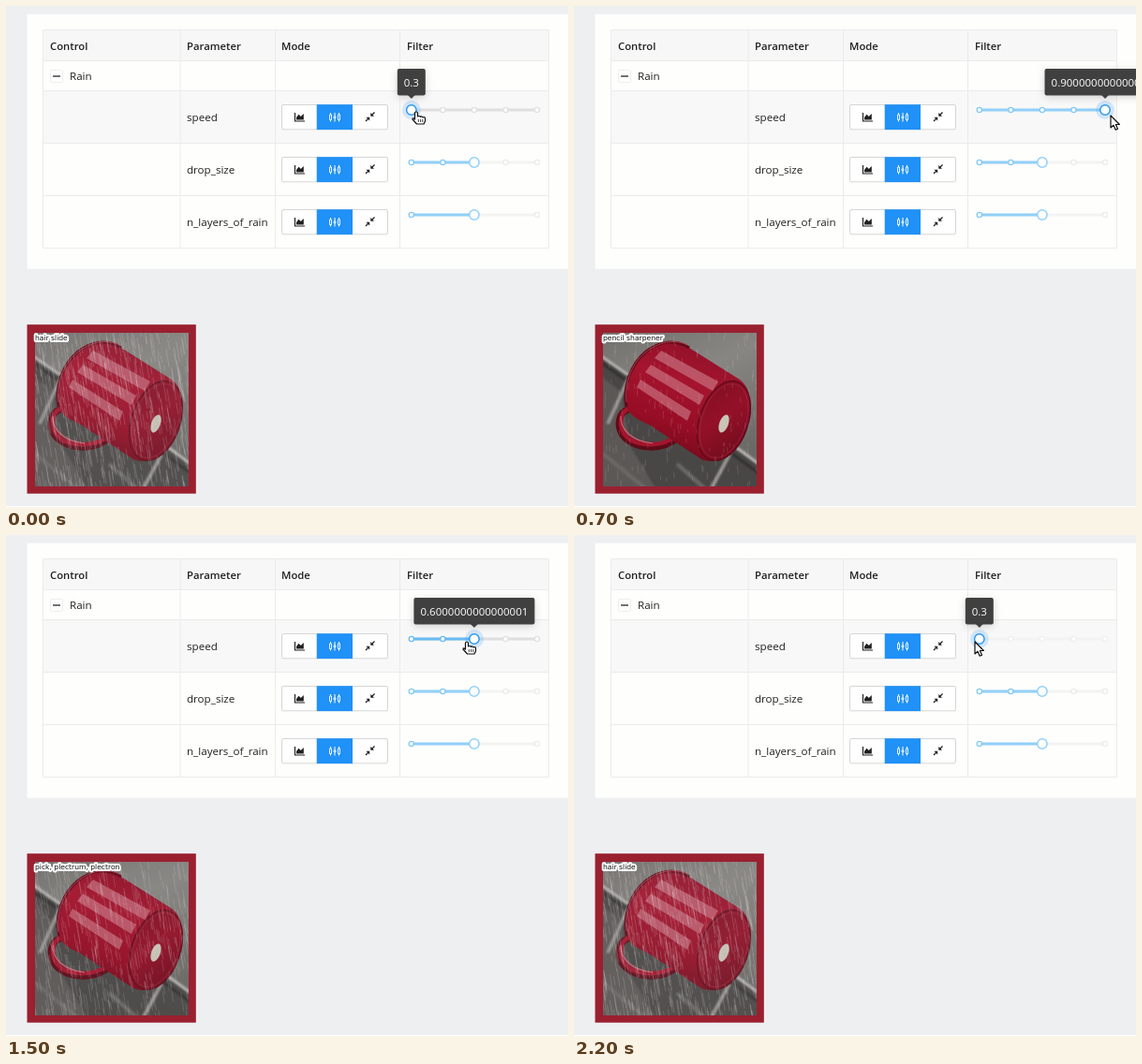
Animation of 600x535 px, one loop 2.3 s. Source, as an HTML page:

```html
<!DOCTYPE html>
<html lang="en">
<head>
<meta charset="utf-8">
<title>Rain controls</title>
<style>
  html, body { margin: 0; width: 100%; height: 100%; overflow: hidden; background: #eeeff1; }
  svg { display: block; width: 600px; height: 535px; font: 11.6px "Open Sans", "Noto Sans", sans-serif; }
  .head { font-weight: 600; font-size: 11.3px; }
  .label { font: 7.6px "DejaVu Sans", sans-serif; paint-order: stroke; stroke: #fff; stroke-width: 4px; stroke-linejoin: round; }
</style>
</head>
<body>
<svg viewBox="0 0 600 535" fill="#202020">
  <defs>
    <filter id="shadow" x="-30%" y="-60%" width="160%" height="240%">
      <feDropShadow dx="0" dy="2" stdDeviation="4" flood-opacity=".16"/>
    </filter>
    <filter id="soft"><feGaussianBlur stdDeviation=".8"/></filter>
    <linearGradient id="wall" x2=".5" y2="1">
      <stop stop-color="#73716e"/><stop offset=".45" stop-color="#888682"/><stop offset="1" stop-color="#6b6966"/>
    </linearGradient>
    <linearGradient id="enamel" x1=".65" y1="0" x2=".3" y2="1">
      <stop stop-color="#8e1128"/><stop offset=".35" stop-color="#a5142e"/>
      <stop offset=".7" stop-color="#960d25"/><stop offset="1" stop-color="#6c0a1a"/>
    </linearGradient>
    <linearGradient id="base" x2=".8" y2="1">
      <stop stop-color="#800e22"/><stop offset=".5" stop-color="#941128"/><stop offset="1" stop-color="#700b1d"/>
    </linearGradient>
    <clipPath id="photo"><rect x="31" y="349" width="164" height="164"/></clipPath>
  </defs>

  <rect width="600" height="535" fill="#eeeff1"/>
  <rect y="534" width="600" height="1" fill="#fff"/>
  <rect x="22.7" y="8.7" width="578" height="272" fill="#fefefd"/>
  <rect x="40" y="26" width="540" height="32" fill="#f8f7f7"/>
  <rect x="40" y="91" width="540" height="56" fill="#f8f8f8"/>
  <path d="M39.5 25.5H579.5V258.5H39.5ZM39.5 58.5H579.5M39.5 90.5H579.5M39.5 146.5H579.5M39.5 202.5H579.5M186 25.5V258.5M287.5 25.5V258.5M420.5 25.5V258.5" fill="none" stroke="#ebebeb"/>
  <g class="head">
    <text x="47" y="46.5">Control</text><text x="193" y="46.5">Parameter</text>
    <text x="294" y="46.5">Mode</text><text x="428" y="46.5">Filter</text>
  </g>
  <rect x="47.5" y="68.5" width="13" height="13" rx="1.5" fill="#fff" stroke="#eee"/>
  <path d="M50 75H58" stroke="#262626" stroke-width="1.3"/>
  <text x="68" y="79.3">Rain</text>
  <g id="rows"></g>

  <rect x="22.5" y="340.2" width="180.3" height="180.5" fill="#9a2030"/>
  <g clip-path="url(#photo)">
    <rect x="31" y="349" width="164" height="164" fill="url(#wall)"/>
    <g filter="url(#soft)">
      <path d="M25 370L62 395 120 440 200 490V520H25Z" fill="#484644"/>
      <path d="M25 392L50 412 60 470 90 520H25Z" fill="#5b5957"/>
      <path d="M25 371L58 394M158 460L200 491" stroke="#c6c4c1" stroke-width="2.4" fill="none"/>
      <path d="M25 378L56 400M150 464L200 501" stroke="#302f2e" stroke-width="3" fill="none"/>
      <path d="M58 398L36 446M166 479L144 520" stroke="#a09e9b" stroke-width="3" fill="none"/>
      <path d="M31 478L82 520M110 489L145 520" stroke="#6b6966" stroke-width="4" fill="none"/>
    </g>
    <path d="M58 431C47 434 46 448 51 457C60 472 92 478 112 460" fill="none" stroke="#5e0b18" stroke-width="7"/>
    <path d="M58 430C49 434 48 447 53 456C62 470 91 473 110 459" fill="none" stroke="#a3152d" stroke-width="4.6"/>
    <path d="M50 438C49 452 62 465 84 467" fill="none" stroke="#cb6676" stroke-width="1.2"/>
    <path d="M123 365C110 355 93 357 78 367C61 380 52 405 56 428C60 438 69 442 80 447L136 484C154 491 174 480 183 455C193 431 190 409 177 399Z" fill="url(#enamel)"/>
    <path d="M123 365C108 355 91 358 77 369C60 383 52 407 56 428" fill="none" stroke="#5f0a19" stroke-width="3"/>
    <path d="M121 362C106 355 90 359 76 370C60 383 54 405 56 423" fill="none" stroke="#b53a4e" stroke-width="1"/>
    <g fill="#d08390" opacity=".58">
      <path d="M86 376L93 368 154 401 148 411Z"/>
      <path d="M76 391L82 383 139 416 134 426Z"/>
      <path d="M67 407L71 399 125 433 121 443Z"/>
    </g>
    <ellipse cx="160" cy="443" rx="26" ry="44" transform="rotate(19 160 443)" fill="url(#base)" stroke="#5c0a18" stroke-width="1.2"/>
    <ellipse cx="160" cy="443" rx="23.5" ry="41" transform="rotate(19 160 443)" fill="none" stroke="#b0364a" stroke-width=".7" opacity=".6"/>
    <ellipse cx="160" cy="446" rx="4.8" ry="10" transform="rotate(20 160 446)" fill="#c9c4b7"/>
    <rect id="haze" x="31" y="349" width="164" height="164" fill="#aaa7a4"/>
    <path id="rain" fill="none" stroke="#e6e4e3" stroke-width=".65" stroke-linecap="round"/>
  </g>
  <text id="label" class="label" x="31" y="356.8" fill="#111"></text>

  <g id="tooltip" filter="url(#shadow)">
    <rect id="bubble" y="67" height="28.5" rx="2" fill="#404040"/>
    <path id="tip" d="M-4 95H4L0 99Z" fill="#404040"/>
    <text id="value" y="86.2" fill="#fff" text-anchor="middle" font-size="11.5"></text>
  </g>
  <g id="cursor" fill="#fff" stroke="#111" stroke-width="1.2" stroke-linejoin="round">
    <g id="hand">
      <path d="M-1.5 1.5Q-1.5 0 0 0T1.5 1.5V5Q3.5 3.8 4.4 5.4Q6.2 4.3 7 6Q9.2 5 9.5 7V10L8 13H.5L-4 8Q-4 5.8-1.5 8Z"/>
      <path d="M2.3 8V11M4.6 8V11M6.8 8V11" stroke-width=".8"/>
    </g>
    <path id="arrow" d="M0 0V13L3 10.3 5.2 15.2 7.5 14.2 5.4 9.5H9.4Z"/>
  </g>
</svg>
<script>
const LOOP = 2300, STEP = 100;
const $ = id => document.getElementById(id);
const LEFT = 432.8, GAP = 33.55;
const stopX = i => LEFT + GAP * i;

const levels = [
  { text: "0.3", label: "hair slide", drops: 620, length: 17, slant: .16, alpha: .29, haze: .1 },
  { text: "0.45", label: "pick, plectrum, plectron", drops: 360, length: 24, slant: .02, alpha: .17, haze: .03 },
  { text: "0.6000000000000001", label: "pick, plectrum, plectron", drops: 500, length: 16, slant: .16, alpha: .25, haze: .06 },
  { text: "0.75", label: "pick, plectrum, plectron", drops: 330, length: 13, slant: .16, alpha: .24, haze: .03 },
  { text: "0.9000000000000001", label: "pencil sharpener", drops: 180, length: 7, slant: .02, alpha: .22, haze: 0 }
];

function seeded(seed) {
  return () => (seed = (seed * 16807) % 2147483647) / 2147483647;
}

function rainPath({ drops, length, slant }, seed) {
  const random = seeded(seed);
  let d = "";
  for (let i = 0; i < drops; i++) {
    const x = 24 + random() * 174, y = 342 + random() * 168;
    const size = length * (.3 + random());
    d += `M${x.toFixed(1)} ${y.toFixed(1)}l${(size * slant).toFixed(1)} ${size.toFixed(1)}`;
  }
  return d;
}
levels.forEach((level, i) => level.rain = rainPath(level, 4177 + i * 911));

const circle = (x, y, r, stroke, width) =>
  `<circle cx="${x}" cy="${y}" r="${r}" fill="#fff" stroke="${stroke}" stroke-width="${width}"/>`;
const bar = (x1, x2, y, color) =>
  `<path d="M${x1} ${y}H${x2}" stroke="${color}" stroke-width="3" stroke-linecap="round"/>`;

function slider(y, stops, at, colors, focused) {
  const x = stopX(at);
  let out = bar(LEFT, stopX(4), y, colors.rail) + (at ? bar(LEFT, x, y, colors.track) : "");
  for (const i of stops) out += circle(stopX(i), y, 2.6, i <= at ? colors.dot : colors.off, 1.3);
  if (focused) out += `<circle cx="${x}" cy="${y}" r="10" fill="#1890ff" opacity=".17"/>`;
  return out + circle(x, y, 5.2, focused ? "#2f98ee" : "#91d0f8", 1.5);
}

function modeButtons(y) {
  return `<g transform="translate(0 ${y})">
    <rect x="294.5" y="-13.5" width="113" height="26.3" rx="1.5" fill="#fff" stroke="#d6d6d6"/>
    <rect x="331.7" y="-13.8" width="38.3" height="26.9" fill="#2091f7"/>
    <path d="M308.5 -5V4H319" fill="none" stroke="#222" stroke-width="1.2"/>
    <path d="M310 2.6V0L312.5 -3.2 314.8 -1 317.8 -4V2.6Z"/>
    <path d="M346.5 -5V4.5M351 -5V4.5M355.5 -5V4.5" stroke="#fff" fill="none"/>
    <path d="M345.5 -3H347.5V2.5H345.5ZM350 -1H352V.6H350ZM354.5 -3H356.5V2.5H354.5Z" fill="#2091f7" stroke="#fff" stroke-width=".9"/>
    <path d="M393.5 -5.5L390 -2M384 4L387.5 .5" stroke="#222" stroke-width="1.3"/>
    <path d="M389.3 -5V-1.3H393ZM384.5 -.2H388.2V3.5Z"/>
  </g>`;
}

const calm = { rail: "#f3f3f3", track: "#91d0f8", dot: "#83c9f5", off: "#ebebeb" };
$("rows").innerHTML = ["speed", "drop_size", "n_layers_of_rain"].map((name, i) =>
  `<text x="193" y="${123.3 + 56 * i}">${name}</text>${modeButtons(119 + 56 * i)}`).join("")
  + slider(167, [0, 1, 2, 3, 4], 2, calm) + slider(223, [0, 4], 2, calm)
  + `<g id="speed"></g>`;

function track(keys, t) {
  const i = keys.findIndex(k => k[0] > t);
  if (i < 0) return keys[keys.length - 1][1];
  const [t0, a] = keys[i - 1], [t1, b] = keys[i];
  return a + (b - a) * (t - t0) / (t1 - t0);
}
const cursorX = [[0, 438], [300, 521], [600, 573], [900, 573], [1200, 526], [1500, 492], [1700, 458], [1900, 428], [2300, 428]];
const cursorY = [[0, 113], [500, 113], [600, 117], [900, 117], [1200, 114], [2300, 114]];
const hover = [[0, 1], [500, 1], [700, 0], [1200, 0], [1400, 1], [1900, 1], [2200, 0], [2300, 0]];

const mix = (from, to, k) =>
  `rgb(${from.map((v, i) => Math.round(v + (to[i] - v) * k)).join()})`;

function showLevel(index) {
  const level = levels[index], x = stopX(index);
  const width = { 3: 30, 4: 36 }[level.text.length] || 129;
  $("bubble").setAttribute("x", x - width / 2);
  $("bubble").setAttribute("width", width);
  $("tip").setAttribute("transform", `translate(${x})`);
  $("value").setAttribute("x", x);
  $("value").textContent = level.text;
  $("label").textContent = level.label;
  $("rain").setAttribute("d", level.rain);
  $("rain").setAttribute("opacity", level.alpha);
  $("haze").setAttribute("opacity", level.haze);
}

let shownStep = -1, shownLevel = -1;
function draw(now) {
  const t = Math.floor(now % LOOP / STEP) * STEP;
  if (t === shownStep) return;
  shownStep = t;
  const x = track(cursorX, t), k = track(hover, t);
  const level = Math.max(0, Math.min(4, Math.round((x - LEFT) / GAP)));
  if (level !== shownLevel) showLevel(shownLevel = level);
  $("speed").innerHTML = slider(111, [0, 1, 2, 3, 4], level, {
    rail: mix([243, 243, 243], [223, 223, 223], k),
    track: mix([145, 208, 248], [105, 187, 244], k),
    dot: mix([131, 201, 245], [105, 187, 244], k),
    off: mix([239, 239, 239], [224, 224, 224], k)
  }, true);
  const pointing = t < 600 || (t >= 1100 && t < 1900);
  $("hand").style.display = pointing ? "" : "none";
  $("arrow").style.display = pointing ? "none" : "";
  $("cursor").setAttribute("transform", `translate(${x} ${track(cursorY, t)})`);
}

const start = performance.now();
function tick() {
  draw(performance.now() - start);
  requestAnimationFrame(tick);
}
tick();
</script>
</body>
</html>
```
